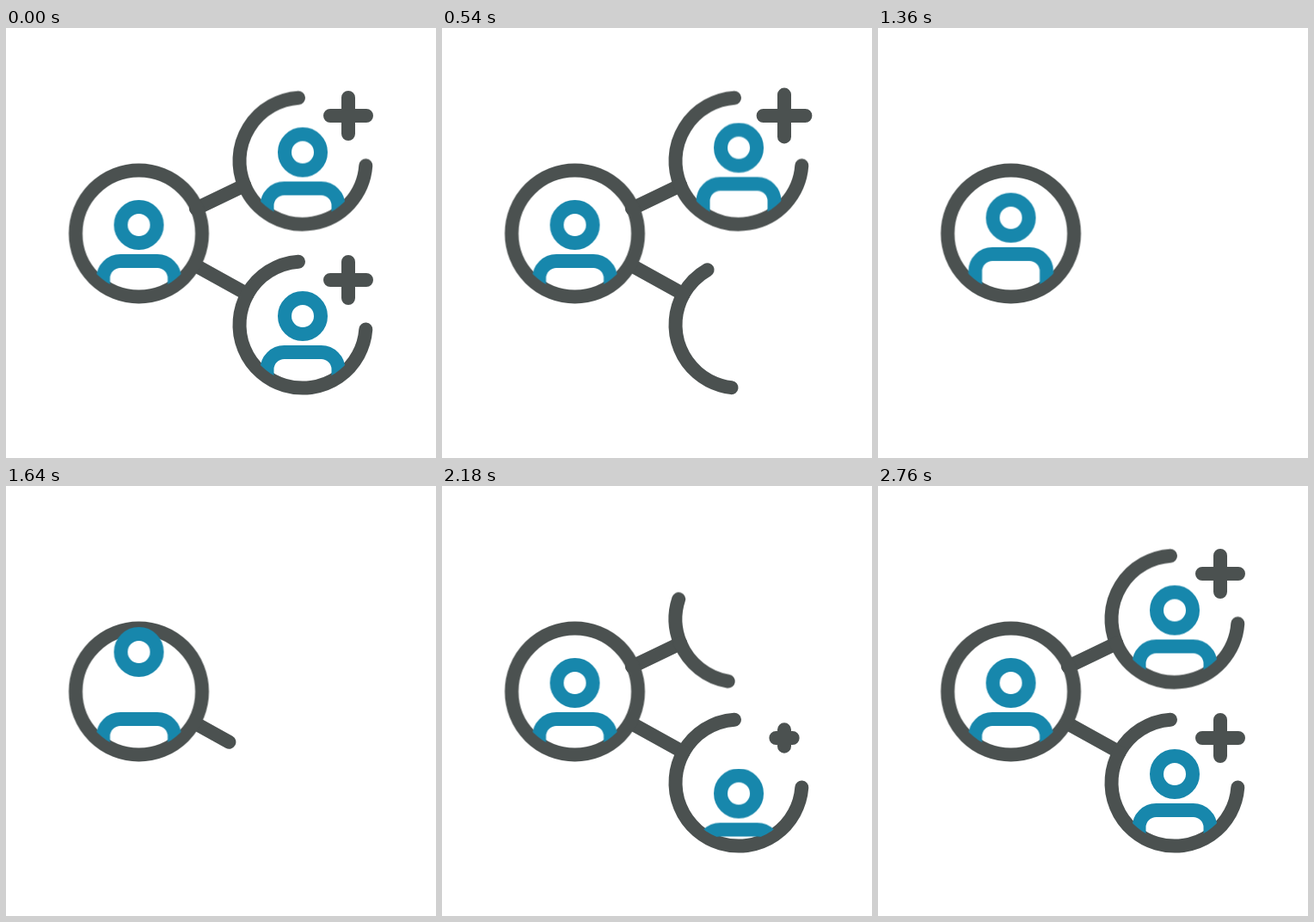
An HTML page for the animation above (3000 ms loop, 500x500 px).

```html
<!DOCTYPE html>
<html lang="en">
<head>
<meta charset="utf-8">
<title>Sharing network</title>
<style>
  html, body { margin: 0; width: 100%; height: 100%; overflow: hidden; background: #fff; }
  svg { display: block; width: 100%; height: 100%; }
  svg { fill: none; stroke-width: 16; stroke-linecap: round; }
  .dark { stroke: #4b5150; }
  .blue { stroke: #1787ac; }

  .line, .arc, .plus, .person, .head, .body {
    animation: 3s cubic-bezier(.37, 0, .63, 1) var(--delay, 0s) infinite;
  }
  /* The upper contact repeats the lower one 268 ms later. */
  .later { --delay: -2.732s; }
  .line { animation-name: line; }
  .arc { animation-name: arc; }
  .plus { animation-name: plus; }
  .person { animation-name: person; }
  .head { animation-name: head; }
  .body { animation-name: body; }

  @keyframes line {
    0%, 24.83% { stroke-dasharray: 100 200; opacity: 1; }
    31.16% { opacity: 1; }
    31.17%, 50% { stroke-dasharray: 0 200; opacity: 0; }
    50.01% { opacity: 1; }
    58%, 100% { stroke-dasharray: 100 200; opacity: 1; }
  }
  @keyframes arc {
    0%, 12.03% { stroke-dasharray: 100 200; opacity: 1; }
    24.82% { opacity: 1; }
    24.83%, 59.13% { stroke-dasharray: 0 200; opacity: 0; }
    59.14% { opacity: 1; }
    70.13%, 100% { stroke-dasharray: 100 200; opacity: 1; }
  }
  @keyframes plus {
    0%, 3.33% { stroke-dasharray: 21 60; opacity: 1; }
    14% { stroke-dasharray: 27 60; }
    17.66% { opacity: 1; }
    17.67%, 69.5% { stroke-dasharray: 0 60; opacity: 0; }
    69.51% { opacity: 1; }
    77.33% { stroke-dasharray: 27 60; }
    83.17%, 100% { stroke-dasharray: 21 60; opacity: 1; }
  }
  @keyframes person {
    0%, .67% { transform: translateY(0); }
    14.67% { transform: translateY(-8px); }
    17.83%, 66.33% { transform: translateY(110px); }
    76% { transform: translateY(-8px); }
    80.33%, 100% { transform: translateY(0); }
  }
  @keyframes body {
    0%, 36.67% { transform: translateY(0); }
    41% { transform: translateY(28px); }
    46% { transform: translateY(-9.6px); }
    52.33%, 100% { transform: translateY(0); }
  }
  @keyframes head {
    0%, 36.67% { transform: translateY(0); }
    41% { transform: translateY(28px); animation-timing-function: cubic-bezier(.12, 0, .39, 0); }
    45.33% { transform: translateY(-8px); animation-timing-function: cubic-bezier(.61, 1, .88, 1); }
    50.67% { transform: translateY(-41px); }
    68.33%, 100% { transform: translateY(0); }
  }
</style>
</head>
<body>
<svg viewBox="0 0 500 500">
  <defs>
    <clipPath id="inside">
      <path d="M-68 -200H68V0A68 68 0 0 1 -68 0Z"/>
    </clipPath>
    <circle id="head" cy="-10" r="21"/>
    <path id="body" d="M-41.5 120V52a20 20 0 0 1 20 -20h43a20 20 0 0 1 20 20V120"/>
    <g id="person"><use href="#head"/><use href="#body"/></g>
    <path id="plus" d="M0 0H30M0 0H-30M0 0V30M0 0V-30"/>
  </defs>

  <g class="dark">
    <path class="line" pathLength="100" d="M222 277L280.7 309.5"/>
    <path class="line later" pathLength="100" d="M221 210L277.2 183"/>
  </g>

  <g transform="translate(154.5 239)">
    <circle class="dark" r="73.5"/>
    <g class="blue" clip-path="url(#inside)">
      <use class="body" href="#body"/>
      <use class="head" href="#head"/>
    </g>
  </g>

  <g transform="translate(345 345)">
    <g class="dark">
      <path class="arc" pathLength="100" d="M-64.3 -35.5A73.5 73.5 0 0 1 -5 -73.3"/>
      <path class="arc" pathLength="100" d="M-64.3 -35.5A73.5 73.5 0 1 0 73.3 5.5"/>
      <g transform="translate(53 -52)"><use class="plus" href="#plus"/></g>
    </g>
    <g class="blue" clip-path="url(#inside)"><use class="person" href="#person"/></g>
  </g>

  <g class="later" transform="translate(345 154.5)">
    <g class="dark">
      <path class="arc" pathLength="100" d="M-67.8 28.5A73.5 73.5 0 0 1 -5 -73.3"/>
      <path class="arc" pathLength="100" d="M-67.8 28.5A73.5 73.5 0 0 0 73.3 5.5"/>
      <g transform="translate(53 -52.5)"><use class="plus" href="#plus"/></g>
    </g>
    <g class="blue" clip-path="url(#inside)"><use class="person" href="#person"/></g>
  </g>
</svg>
</body>
</html>
```
